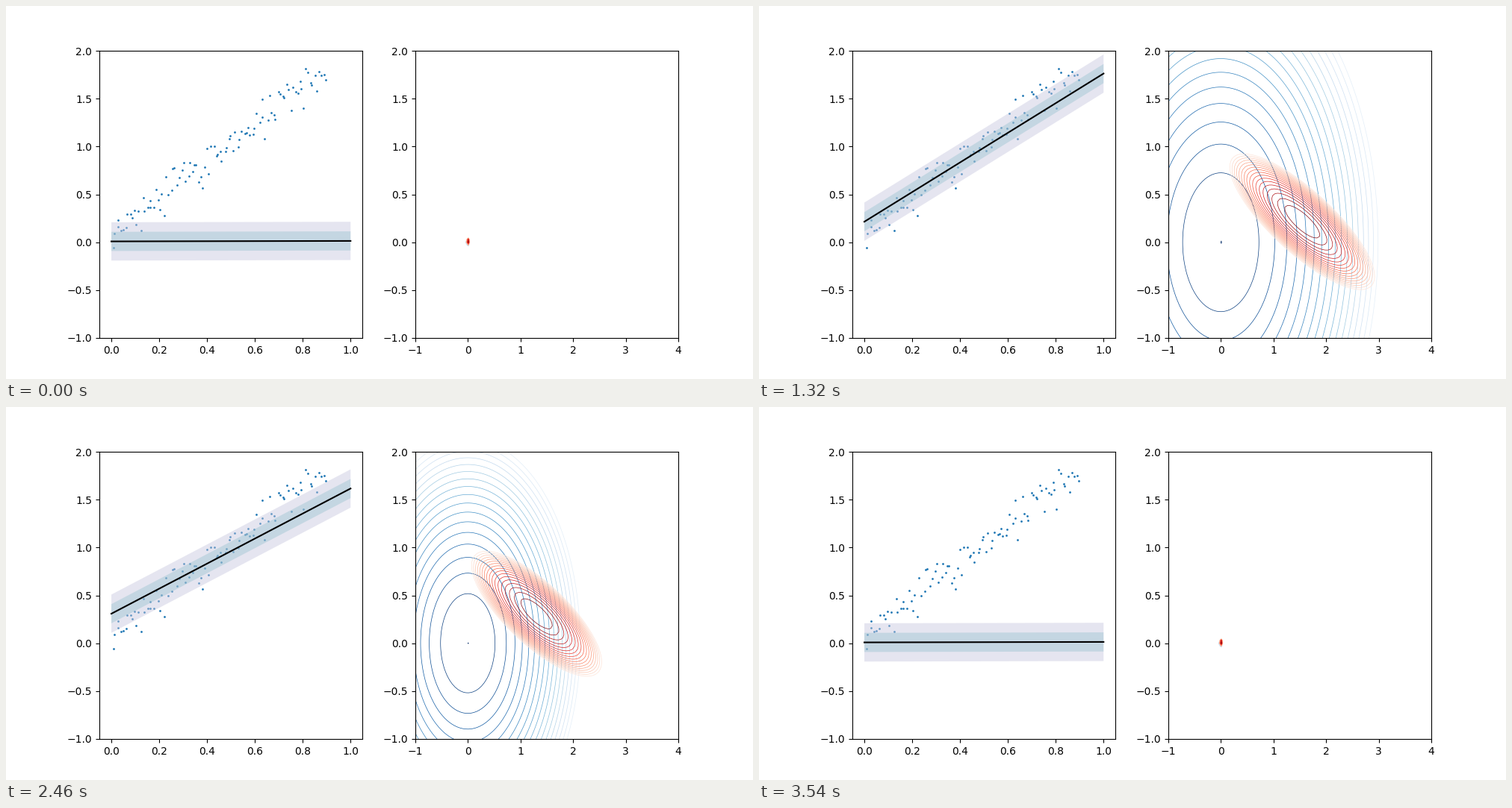
Write a matplotlib script that moves like this. It is 1000 px wide and 500 px high and loops after 3600 ms.

```python
import numpy as np
import matplotlib.pyplot as plt
from matplotlib.animation import FuncAnimation

FRAMES, INTERVAL = 60, 60
POINTS = 100

plt.rcParams["font.family"] = "DejaVu Sans"

# Noisy observations of a straight line, spread evenly over [0, 0.9].
rng = np.random.default_rng(4)
xs = .9 * (np.arange(POINTS) + rng.random(POINTS)) / POINTS
ys = .045 + 1.96 * xs + rng.normal(0, .115, POINTS).clip(-.22, .22)

# Sufficient statistics of the regression for weights (slope, intercept).
GRAM = np.array([[25.10, 42.43], [42.43, POINTS]])
MOMENT = np.array([51.04, 87.53])

# The two faintest levels are too close to white to show.
LOG_MIN = -10
LEVELS = np.linspace(LOG_MIN, -.0005, 20)[2:]
SLOPES, INTERCEPTS = np.meshgrid(np.linspace(-1, 4, 100), np.linspace(-1, 2, 100))

fig, (ax_fit, ax_weights) = plt.subplots(1, 2, figsize=(10, 5), dpi=100)


def make_band(color, alpha):
    return ax_fit.fill([0, 1, 1, 0], [0] * 4, color=color, alpha=alpha, lw=0)[0]


ax_fit.plot(xs, ys, "o", ms=1, color="#1f77b4", zorder=.5)
bands = [(.2, make_band("#c7c7de", .45)), (.1, make_band("#88bbc8", .35))]
mean_line, = ax_fit.plot([0, 1], [0, 0], color="black")
ax_fit.set(xlim=(-.05, 1.05), ylim=(-1, 2))
ax_weights.set(xlim=(-1, 4), ylim=(-1, 2))

contours = []


def draw_gaussian(mean, precision, cmap):
    """Contours of the unnormalised log density."""
    u, v = SLOPES - mean[0], INTERCEPTS - mean[1]
    (a, b), (_, c) = precision
    log_density = -.5 * (a * u**2 + 2 * b * u * v + c * v**2)
    contours.append(ax_weights.contour(
        SLOPES, INTERCEPTS, log_density, levels=LEVELS, cmap=cmap,
        vmin=LOG_MIN, vmax=0, linewidths=.5, linestyles="solid"))


def update(frame):
    while contours:
        contours.pop().remove()

    prior_std = .01 + np.sin(np.pi * frame / FRAMES) ** 4
    prior = np.eye(2) / prior_std**2
    posterior = GRAM + prior
    slope, intercept = mean = np.linalg.solve(posterior, MOMENT)

    left, right = intercept, intercept + slope
    mean_line.set_ydata([left, right])
    for half, band in bands:
        band.set_xy([(0, left - half), (1, right - half),
                     (1, right + half), (0, left + half)])

    draw_gaussian((0, 0), prior, "Blues")
    draw_gaussian(mean, posterior, "Reds")
    return []


anim = FuncAnimation(fig, update, frames=FRAMES, interval=INTERVAL,
                     init_func=lambda: [], repeat=True, repeat_delay=0, blit=False)
plt.show()
```
